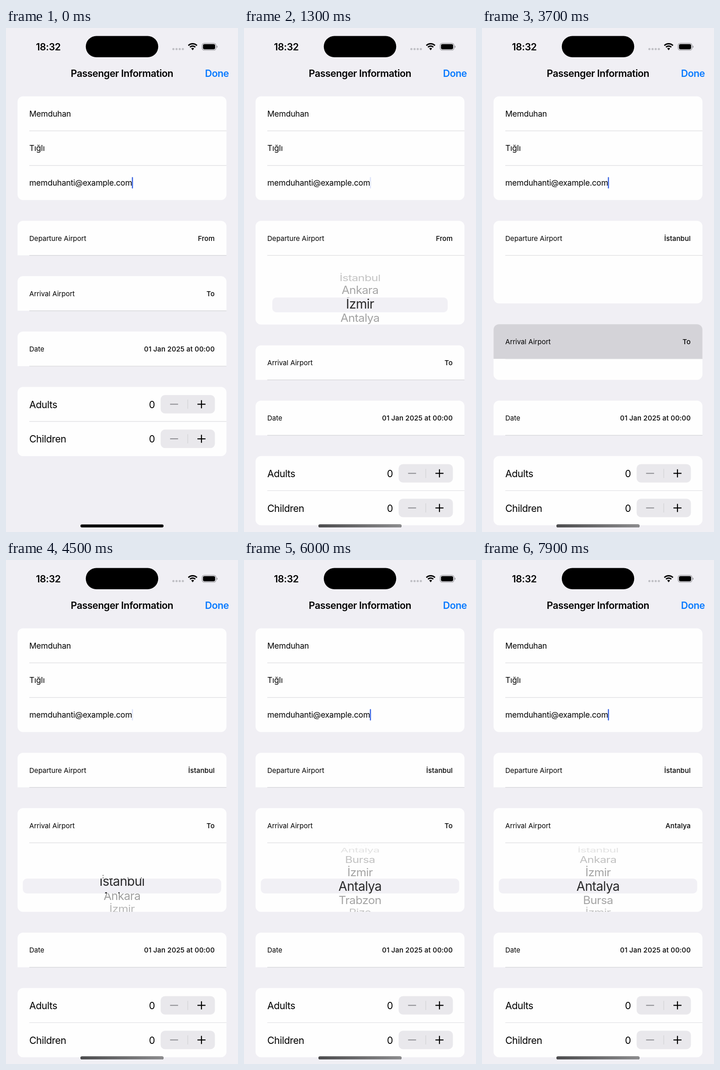
Write an HTML page with a canvas that moves like this. It is 508 px wide and 1103 px high and loops after 8000 ms.

```html
<!DOCTYPE html>
<html lang="en">
<head>
<meta charset="utf-8">
<title>Passenger form</title>
<style>
  html, body { margin: 0; width: 100%; height: 100%; overflow: hidden; background: #f0eff4; }
  canvas { display: block; width: 508px; height: 1103px; }
</style>
</head>
<body>
<canvas id="stage"></canvas>
<script>
const W = 508, H = 1103, LOOP = 8000;
const LEFT = 25.3, RIGHT = 482.7, PAD = 51, EDGE = 457;
const ROW = 75.7, PICKER = 151.3, RADIUS = 12;
const CITIES = ['İstanbul', 'Ankara', 'İzmir', 'Antalya', 'Bursa', 'İzmir', 'Antalya', 'Trabzon', 'Rize'];

// Each wheel: band placement and [time, row] stops, eased between neighbours
const WHEEL_FROM = {
  middle: 108.4, bandLeft: 62,
  stops: [[950, 0], [1550, 3.3], [2400, 0.2], [2550, 0.2], [2950, 0]]
};
const WHEEL_TO = {
  middle: 94.7, bandLeft: 36.8,
  stops: [[4400, 0], [5000, 4], [5450, 4], [6000, 6], [6150, 6], [7300, 3]]
};

const STYLE = {
  title: { size: 21.3, weight: 600, spacing: -0.43 },
  body: { size: 21.3, weight: 400, spacing: -0.45 },
  field: { size: 17.5, weight: 400, spacing: -0.22 },
  label: { size: 15.05, weight: 400, spacing: 0 },
  value: { size: 15.05, weight: 500, spacing: 0.1 },
  wheel: { size: 25.3, weight: 400, spacing: -0.6 }
};

const canvas = document.getElementById('stage');
const ctx = canvas.getContext('2d');
const dpr = window.devicePixelRatio || 1;
canvas.width = W * dpr;
canvas.height = H * dpr;

const ramp = (t, a, b) => Math.min(1, Math.max(0, (t - a) / (b - a)));
const smooth = u => u * u * (3 - 2 * u);

function follow(stops, t) {
  let value = stops[0][1];
  for (let i = 1; i < stops.length; i++) {
    const [t0, v0] = stops[i - 1], [t1, v1] = stops[i];
    if (t >= t0) value = v0 + (v1 - v0) * smooth(ramp(t, t0, t1));
  }
  return value;
}

// y is the middle of the capitals
function text(str, x, y, style, align = 'left', color = '#000') {
  ctx.font = `${style.weight} ${style.size}px Inter, sans-serif`;
  ctx.letterSpacing = style.spacing + 'px';
  ctx.textAlign = align;
  ctx.fillStyle = color;
  ctx.fillText(str, x, y + style.size * 0.364);
}

function box(x, y, w, h, r, color) {
  ctx.beginPath();
  ctx.roundRect(x, y, w, h, r);
  ctx.fillStyle = color;
  ctx.fill();
}

function stroke(color, width, ...points) {
  ctx.beginPath();
  points.forEach(([x, y], i) => i % 2 ? ctx.lineTo(x, y) : ctx.moveTo(x, y));
  ctx.strokeStyle = color;
  ctx.lineWidth = width;
  ctx.stroke();
}

function clipped(area, draw, hole) {
  ctx.save();
  ctx.beginPath();
  ctx.rect(...area);
  if (hole) ctx.rect(...hole);
  ctx.clip('evenodd');
  draw();
  ctx.restore();
}

const separator = (y, color = '#dddde0') => stroke(color, 1.2, [PAD, y], [RIGHT, y]);

function statusBar() {
  text('18:32', 65.5, 41.3, STYLE.title);
  box(174.7, 17.5, 158.6, 46.5, 23.2, '#000');
  for (let i = 0; i < 4; i++) box(364.2 + i * 6.9, 43.8, 4.7, 4.7, 2.35, '#bfbfc4');

  ctx.strokeStyle = '#000';
  ctx.lineWidth = 3;
  for (const r of [13.3, 8.2]) {
    ctx.beginPath();
    ctx.arc(408.7, 47.8, r, -Math.PI * 0.75, -Math.PI * 0.25);
    ctx.stroke();
  }
  ctx.beginPath();
  ctx.moveTo(408.7, 48.8);
  ctx.arc(408.7, 47.8, 4.4, -Math.PI * 0.75, -Math.PI * 0.25);
  ctx.fillStyle = '#000';
  ctx.fill();

  ctx.beginPath();
  ctx.roundRect(429.3, 33.3, 30.6, 15.4, 5);
  ctx.strokeStyle = '#9c9ca0';
  ctx.lineWidth = 1.3;
  ctx.stroke();
  box(431.3, 35.3, 26.6, 11.4, 3.4, '#000');
  box(461.2, 38.4, 2, 5.2, [0, 2, 2, 0], '#9c9ca0');
}

function cursorAlpha(t) {
  const phase = t % 1000;
  return phase < 400 ? 1 - ramp(phase, 165, 330) : ramp(phase, 480, 600);
}

function contactCard(t) {
  const top = 149.5;
  box(LEFT, top, RIGHT - LEFT, ROW * 3, RADIUS, '#fefefe');
  ['Memduhan', 'Tığlı', 'memduhanti@example.com'].forEach((line, i) => {
    text(line, PAD, top + ROW * (i + 0.5), STYLE.field);
    if (i) separator(top + ROW * i);
  });
  ctx.globalAlpha = cursorAlpha(t);
  box(275.6, 326.3, 2.5, 25, 1.2, '#3c66e0');
  ctx.globalAlpha = 1;
}

function wheelRows(middle, position, zoom) {
  CITIES.forEach((city, i) => {
    const angle = (i - position) * 0.34;
    if (Math.abs(angle) > 1.4) return;
    const alpha = zoom > 1 ? 0.83 : 0.4 * Math.cos(angle) ** 2;
    ctx.save();
    ctx.translate(W / 2, middle + 91.5 * Math.sin(angle) * zoom);
    ctx.scale(zoom, zoom * Math.cos(angle));
    text(city, 0, 0, STYLE.wheel, 'center', `rgba(0,0,0,${alpha})`);
    ctx.restore();
  });
}

function drawWheel(wheel, top, height, t, alpha) {
  const middle = top + wheel.middle, position = follow(wheel.stops, t);
  const band = [wheel.bandLeft, middle - 16.2, W - 2 * wheel.bandLeft, 32.4];
  const area = [LEFT, top + 1, RIGHT - LEFT, Math.max(0, height - 1)];
  clipped(area, () => {
    ctx.globalAlpha = alpha;
    box(...band, 9, '#f1f0f5');
    clipped(area, () => wheelRows(middle, position, 1), band);
    clipped(band, () => wheelRows(middle, position, 1.105));
  });
}

// One titled row that may be unfolded by `open` pixels
function rowCard(top, label, value, open = 0, pressed = 0) {
  const corners = open > 0.5 ? RADIUS : [RADIUS, RADIUS, 0, 0];
  box(LEFT, top, RIGHT - LEFT, ROW + open, corners, '#fefefe');
  if (pressed) {
    ctx.globalAlpha = pressed;
    box(LEFT, top, RIGHT - LEFT, ROW, [RADIUS, RADIUS, 0, 0], '#d4d3d8');
    ctx.globalAlpha = 1;
  }
  separator(top + ROW, open > 0.5 ? '#dddde0' : '#d3d3d7');
  text(label, PAD, top + ROW / 2 + 0.3, STYLE.label);
  text(value, EDGE, top + ROW / 2 + 0.3, STYLE.value, 'right');
}

function stepper(y) {
  box(338.6, y - 20.2, 118.8, 40.4, 9.5, '#e9e8ec');
  stroke('#d0d0d4', 1.2, [398, y - 10], [398, y + 10]);
  stroke('#8b8b90', 2, [359.3, y], [376.8, y]);
  stroke('#000', 2.2, [419.2, y], [436.8, y], [428, y - 8.8], [428, y + 8.8]);
}

function guestsCard(top) {
  box(LEFT, top, RIGHT - LEFT, ROW * 2, RADIUS, '#fefefe');
  separator(top + ROW);
  ['Adults', 'Children'].forEach((label, i) => {
    const y = top + ROW * (i + 0.5);
    text(label, PAD, y + 0.6, STYLE.body);
    text('0', 319.5, y + 0.6, STYLE.body, 'center');
    stepper(y);
  });
}

function homeBar(shade) {
  const shape = [163, 1086.6, 182, 6.3, 3.15];
  box(...shape, '#000');
  const grey = ctx.createLinearGradient(163, 0, 345, 0);
  grey.addColorStop(0, '#4c4c4e');
  grey.addColorStop(1, '#8c8c8e');
  ctx.globalAlpha = shade;
  box(...shape, grey);
  ctx.globalAlpha = 1;
}

const press = (t, at) => t < at ? 0 : 1 - ramp(t, at + 120, at + 300);
const unfold = (t, at) => smooth(ramp(t, at - 20, at + 310));

function draw(t) {
  const tapFrom = 500, tapTo = 3600;
  const opened = unfold(t, tapFrom), swapped = unfold(t, tapTo);
  const fromOpen = (opened - swapped) * PICKER, toOpen = swapped * PICKER;

  ctx.setTransform(dpr, 0, 0, dpr, 0, 0);
  ctx.fillStyle = '#f0eff4';
  ctx.fillRect(0, 0, W, H);

  statusBar();
  text('Passenger Information', W / 2, 99, STYLE.title, 'center');
  text('Done', 488, 99, STYLE.title, 'right', '#087aff');
  contactCard(t);

  const fromTop = 421.9, toTop = 543.1 + fromOpen, dateTop = 664.3 + fromOpen + toOpen;
  rowCard(fromTop, 'Departure Airport', t < 2900 ? 'From' : 'İstanbul', fromOpen, press(t, tapFrom));
  if (opened && !swapped) drawWheel(WHEEL_FROM, fromTop + ROW, fromOpen, t, opened);
  rowCard(toTop, 'Arrival Airport', t < 7800 ? 'To' : 'Antalya', toOpen, press(t, tapTo));
  if (swapped) drawWheel(WHEEL_TO, toTop + ROW, toOpen, t, swapped);
  rowCard(dateTop, 'Date', '01 Jan 2025 at 00:00');
  guestsCard(dateTop + 121.2);
  homeBar(opened);
}

function tick(now) {
  draw(now % LOOP);
  requestAnimationFrame(tick);
}
requestAnimationFrame(tick);
</script>
</body>
</html>
```
